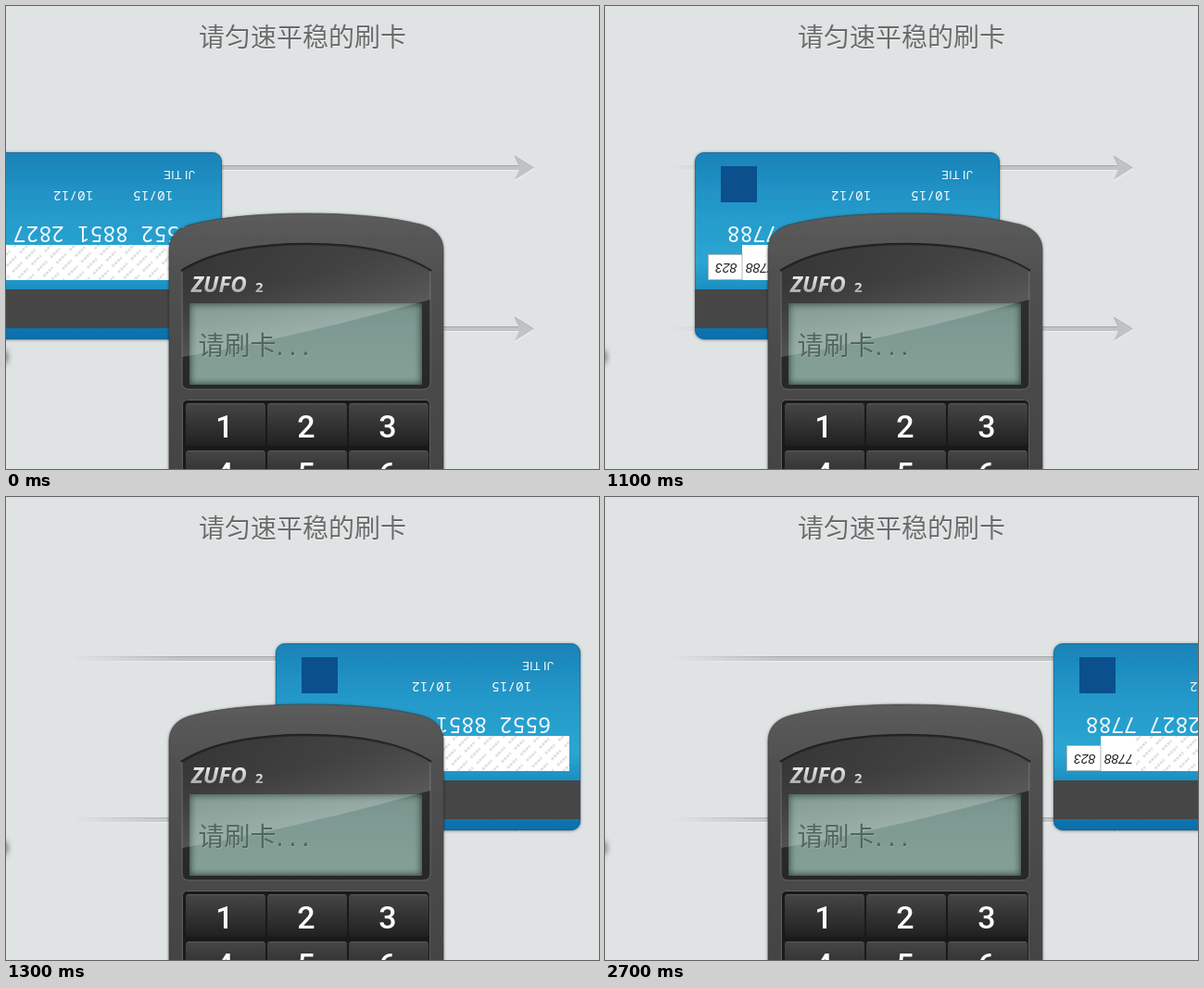
Animation, 640 px wide and 500 px high, one loop 3500 ms. Source, as an HTML page:

```html
<!DOCTYPE html>
<html lang="zh-CN">
<head>
<meta charset="utf-8">
<title>刷卡</title>
<style>
  html, body { margin: 0; width: 100%; height: 100%; overflow: hidden; background: #dfe3e4; }
  svg { display: block; width: 640px; height: 500px; }
  .cjk { font: 28px "Noto Sans CJK SC", "Noto Sans CJK", sans-serif; }
  .dots { font: 23.2px "DejaVu Sans Mono", monospace; }
  .digits { font-family: "Noto Sans Mono", monospace; font-weight: 500; fill: #f2f8fb; }
  .name { font: 13.5px Roboto, sans-serif; fill: #e9f4f9; }
  .pen { font: italic 14px "Liberation Sans", sans-serif; fill: #222; }
  .key { font: 500 34px Roboto, sans-serif; fill: #fff; text-anchor: middle; }
  .brand { font: italic bold 24px "Open Sans", sans-serif; }
  .model { font: bold 15px "Open Sans", sans-serif; }
</style>
</head>
<body>
<svg viewBox="0 0 640 500">
  <defs>
    <linearGradient id="fade" gradientUnits="userSpaceOnUse" x1="72" y1="0" x2="190" y2="0">
      <stop stop-color="#fff" stop-opacity="0"/><stop offset="1" stop-color="#fff"/>
    </linearGradient>
    <mask id="fadeIn" maskUnits="userSpaceOnUse" x="0" y="-20" width="640" height="40">
      <rect y="-20" width="640" height="40" fill="url(#fade)"/>
    </mask>
    <linearGradient id="blue" x2="0" y2="1">
      <stop stop-color="#1a82b7"/><stop offset=".3" stop-color="#2499ca"/>
      <stop offset=".58" stop-color="#2ba6d1"/><stop offset=".75" stop-color="#1b8dc1"/>
      <stop offset="1" stop-color="#076da8"/>
    </linearGradient>
    <linearGradient id="body" x2="0" y2="1">
      <stop stop-color="#5c5c5c"/><stop offset=".2" stop-color="#515151"/><stop offset="1" stop-color="#434343"/>
    </linearGradient>
    <linearGradient id="panel" x2="0" y2="1">
      <stop stop-color="#383838"/><stop offset=".25" stop-color="#303030"/><stop offset="1" stop-color="#272727"/>
    </linearGradient>
    <linearGradient id="gloss" gradientUnits="userSpaceOnUse" x1="300" y1="255" x2="325" y2="350">
      <stop stop-color="#fff" stop-opacity=".02"/><stop offset=".4" stop-color="#fff" stop-opacity=".07"/>
      <stop offset="1" stop-color="#fff" stop-opacity=".2"/>
    </linearGradient>
    <linearGradient id="lcd" x2="0" y2="1">
      <stop stop-color="#78938b"/><stop offset=".35" stop-color="#7f9a92"/><stop offset="1" stop-color="#84a097"/>
    </linearGradient>
    <linearGradient id="keyFace" x2="0" y2="1">
      <stop stop-color="#464646"/><stop offset=".5" stop-color="#333"/><stop offset="1" stop-color="#202020"/>
    </linearGradient>
    <linearGradient id="silver" x2="0" y2="1">
      <stop offset=".25" stop-color="#eee"/><stop offset=".8" stop-color="#aaa"/>
    </linearGradient>
    <pattern id="hatch" width="20" height="9" patternUnits="userSpaceOnUse" patternTransform="rotate(-45)">
      <path d="M1 3H15" stroke="#dcdcdc" stroke-width="2.5" stroke-dasharray="3 1"/>
    </pattern>
    <filter id="soft" x="-10%" y="-10%" width="120%" height="120%">
      <feDropShadow dx="0" dy="0.5" stdDeviation="1.8" flood-color="#000" flood-opacity=".5"/>
    </filter>
    <filter id="blur" x="-50%" y="-50%" width="200%" height="200%"><feGaussianBlur stdDeviation="3"/></filter>
    <clipPath id="lcdClip"><rect x="198" y="321" width="251" height="88"/></clipPath>
    <path id="panelShape" d="M190 286C222 265 270 257 324 257S426 265 458 286V406q0 8-8 8H198q-8 0-8-8Z"/>
    <clipPath id="panelClip"><use href="#panelShape"/></clipPath>
    <g id="arrow">
      <g mask="url(#fadeIn)">
        <path d="M72-2H555V3H72Z" fill="#c0c4c5"/>
        <path d="M72-1.500H553" stroke="#a4a8aa"/>
        <path d="M72 3.500H552" stroke="#eef0f1"/>
      </g>
      <path d="M549 15 570 2" stroke="#eef0f1"/>
      <path d="M549-12 569.500 .7 549 13.500 554 3V-2Z" fill="#bfc3c4"/>
      <path d="M554-2 549-12 569.500 .7" fill="none" stroke="#a9adaf" stroke-width=".8"/>
    </g>
  </defs>

  <rect width="640" height="500" fill="#dfe3e4"/>
  <text class="cjk" x="208" y="45" fill="#fff" opacity=".8">请匀速平稳的刷卡</text>
  <text class="cjk" x="208" y="44" fill="#6b6b6b">请匀速平稳的刷卡</text>
  <ellipse cx="-3" cy="379" rx="5" ry="8" fill="#333" opacity=".6" filter="url(#blur)"/>
  <use href="#arrow" y="174"/>
  <use href="#arrow" y="348"/>

  <g id="card">
    <rect y="1" width="329" height="202" rx="10" fill="url(#blue)" filter="url(#soft)"/>
    <rect x=".5" y="1.500" width="328" height="201" rx="9.500" fill="none" stroke="#0d6394" opacity=".55"/>
    <rect x="28" y="16" width="39" height="39" fill="#0b4f8c"/>
    <rect x="51" y="101" width="266" height="38" fill="#fff"/>
    <rect x="89" y="101" width="228" height="38" fill="url(#hatch)"/>
    <rect x="14.500" y="111.500" width="36.500" height="27" fill="#fff" stroke="#a9b9c0"/>
    <rect y="149" width="329" height="42" fill="#464646"/>
    <g transform="rotate(180 164.500 101.500)">
      <text class="name" x="29" y="182">JI TIE</text>
      <g class="digits" font-size="14.500">
        <text x="52.500" y="160.500">10/15</text>
        <text x="138.500" y="160.500">10/12</text>
      </g>
      <g class="digits" font-size="23">
        <text x="32" y="122">6552 8851 2827 7788</text>
      </g>
      <text class="pen" x="243" y="82">7788</text>
      <text class="pen" x="283.500" y="82">823</text>
    </g>
  </g>

  <path id="device" d="M176 510V264C176 249 185 240 200 236C236 227 280 224 324 224S412 227 448 236C463 240 472 249 472 264V510Z"
        fill="url(#body)" stroke="#3c3c3c" stroke-opacity=".6" filter="url(#soft)"/>
  <use href="#panelShape" fill="url(#panel)" stroke="#666"/>
  <path d="M189 286C222 265 270 257 324 257S426 265 459 286" fill="none" stroke="#202020" stroke-width="2.500"/>
  <g clip-path="url(#lcdClip)">
    <rect x="198" y="321" width="251" height="88" fill="url(#lcd)"/>
    <rect x="196" y="319" width="255" height="92" fill="none" stroke="#17201d" stroke-width="7" opacity=".7" filter="url(#blur)"/>
  </g>
  <path clip-path="url(#panelClip)" d="M190 250H458V317Q325 355 190 379Z" fill="url(#gloss)"/>
  <g fill="#a5bdb4" opacity=".7">
    <text class="cjk" x="208" y="378">请刷卡</text>
    <text class="dots" x="289" y="378">...</text>
  </g>
  <g fill="#52665f">
    <text class="cjk" x="207.500" y="377">请刷卡</text>
    <text class="dots" x="288.500" y="377">...</text>
  </g>
  <g fill="url(#silver)">
    <text class="brand" x="200" y="309">ZUFO</text>
    <text class="model" x="269" y="309">2</text>
  </g>

  <rect x="190.500" y="425.500" width="267" height="90" rx="5" fill="#191919" stroke="#5e5e5e"/>
  <g id="keys"></g>
</svg>
<script>
  const LOOP = 3500, START = 1000, STEP = 100, STEPS = 6;
  const FROM = -96, TRAVEL = 580;
  const card = document.getElementById('card');

  document.getElementById('keys').innerHTML = [1, 2, 3, 4, 5, 6].map((label, i) => {
    const x = 194 + i % 3 * 88, y = 429 + (i > 2 ? 51 : 0);
    return `<rect x="${x}" y="${y}" width="86" height="46" rx="3" fill="url(#keyFace)"/>
      <path d="M${x + 2} ${y + .5}h82" stroke="#5a5a5a"/>
      <text class="key" x="${x + 42}" y="${y + 36.5}">${label}</text>`;
  }).join('');

  function draw(now) {
    const t = now % LOOP;
    const step = Math.max(0, Math.min(STEPS, Math.floor((t - START) / STEP) + 1));
    card.setAttribute('transform', `translate(${Math.round(FROM + TRAVEL * step / STEPS)} 157)`);
  }

  const origin = performance.now();
  function tick() {
    draw(performance.now() - origin);
    requestAnimationFrame(tick);
  }
  tick();
</script>
</body>
</html>
```
